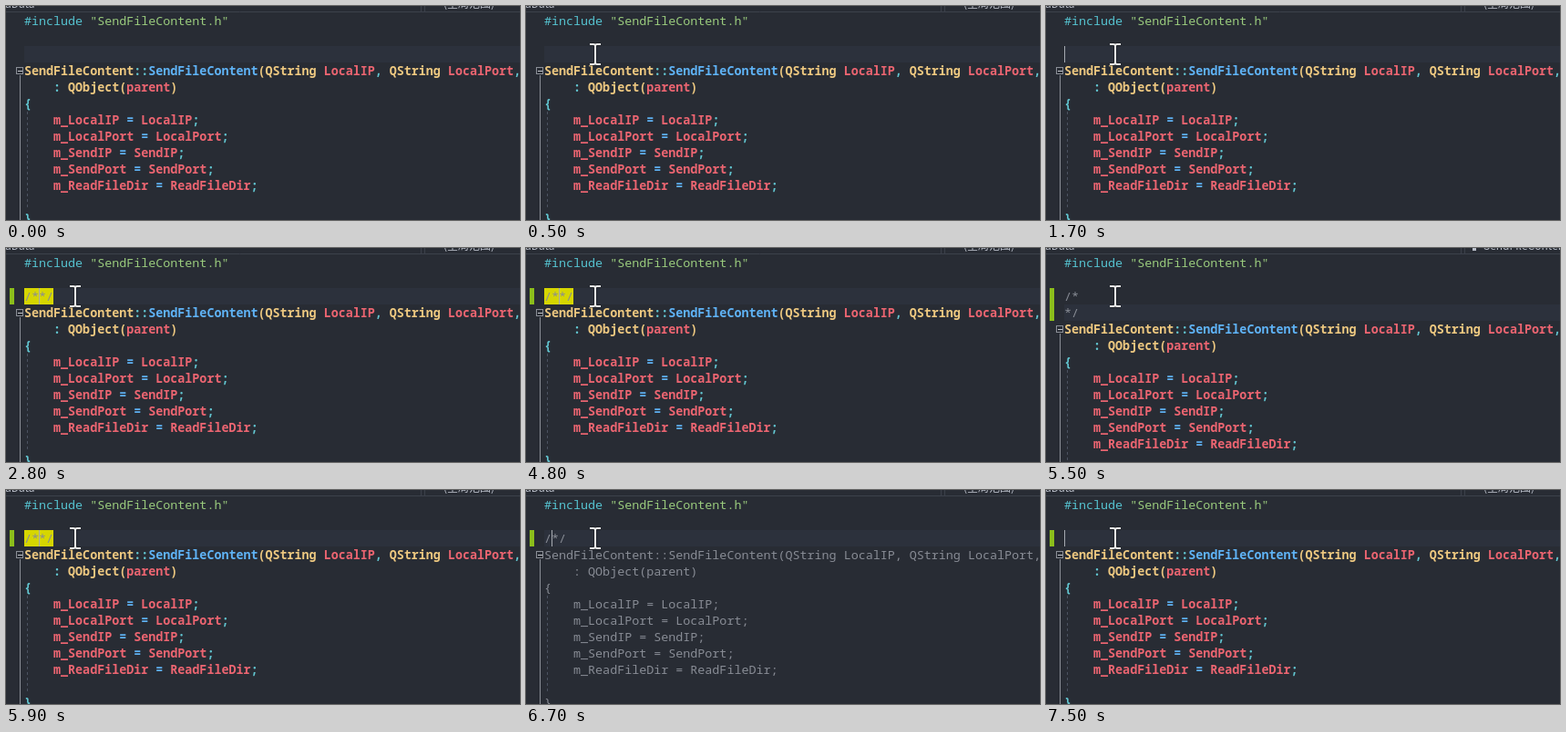
Recreate the animation shown at these times as an HTML page. Size 564 by 235 pixels, loop 8 s.

```html
<!DOCTYPE html>
<html lang="en">
<head>
<meta charset="utf-8">
<title>Code editor</title>
<style>
html, body { margin: 0; width: 100%; height: 100%; overflow: hidden; background: #282c34; }
svg { display: block; position: absolute; left: 0; top: 0; }
text { font: 13.36px "Noto Sans Mono", "DejaVu Sans Mono", monospace; white-space: pre; }
.nav text { font: 12px "Noto Sans CJK SC", "Noto Sans CJK", "Open Sans", sans-serif; fill: #b9bec8; }
.kw, .str { font-weight: 500; }
.type, .fn, .var, .op, .eq { font-weight: 600; }
.kw { fill: #56c3d0; } .str { fill: #9acb7d; } .type { fill: #edc880; }
.fn, .eq { fill: #5fb3f6; } .var { fill: #ec6571; } .op { fill: #62c6d1; }
.note { fill: #888c95; }
.muted tspan { fill: #888c95; font-weight: 400; }
</style>
</head>
<body>
<svg width="564" height="235" viewBox="0 0 564 235">
  <rect width="564" height="235" fill="#282c34"/>
  <g class="nav">
    <path d="M0 6.5H564M455.5 0V6M459.5 0V6" stroke="#3c414b" fill="none"/>
    <text x="-1" y="2">aData</text>
    <text id="scope" x="480" y="2">(全局范围)</text>
    <rect id="icon" x="468" y="0" width="4" height="3" fill="#b9bec8"/>
  </g>
  <rect id="band" x="20" width="544" height="18" fill="#2c313c"/>
  <rect id="margin" x="4" y="44" width="5" fill="#8cbe1b"/>
  <rect id="match" x="20" y="44" width="32" height="18" fill="#d6d600"/>
  <g id="head"></g>
  <text id="typed" class="note" x="20" y="58"></text>
  <text id="closing" class="note" x="20" y="76">*/</text>
  <g id="body">
    <path d="M15.5 76V260" stroke="#8b8f97" fill="none"/>
    <path d="M23.5 116V224" stroke="#4b5160" stroke-dasharray="3 3" fill="none"/>
    <rect x="11.5" y="67.5" width="7" height="7" fill="#282c34" stroke="#8b8f97"/>
    <path d="M13 71.5H18" stroke="#c3c6cb"/>
    <g id="code"></g>
  </g>
  <rect id="caret" width="1" height="18" fill="#a6aab1"/>
  <g id="mouse" fill="none">
    <path id="beam" d="M-6 -11H-2Q0 -11 0 -9Q0 -11 2 -11H6M0 -9V9M-6 11H-2Q0 11 0 9Q0 11 2 11H6" stroke="#16181c" stroke-width="3"/>
  </g>
</svg>
<script>
const $ = id => document.getElementById(id);
const NS = "http://www.w3.org/2000/svg";
const LOOP = 8000, LINE = 18, CHAR = 8;

// Each line is a list of "class:text" runs.
function addLine(parent, y, runs) {
  const line = document.createElementNS(NS, "text");
  line.setAttribute("x", 20);
  line.setAttribute("y", y);
  for (const run of runs) {
    const cut = run.indexOf(":");
    const span = document.createElementNS(NS, "tspan");
    span.setAttribute("class", run.slice(0, cut));
    span.textContent = run.slice(cut + 1);
    line.append(span);
  }
  parent.append(line);
}

addLine($("head"), 21, ["kw:#include ", 'str:"SendFileContent.h"']);
const code = $("code");
const addCode = (row, ...runs) => addLine(code, 22 + row * LINE, runs);
addCode(3, "type:SendFileContent", "op:::", "fn:SendFileContent", "type:(",
  "type:QString ", "var:LocalIP", "op:, ", "type:QString ", "var:LocalPort", "op:,");
addCode(4, "op:    : ", "type:QObject", "type:(", "var:parent", "type:)");
addCode(5, "op:{");
["LocalIP", "LocalPort", "SendIP", "SendPort", "ReadFileDir"].forEach((name, i) =>
  addCode(6 + i, "var:    m_" + name, "eq: = ", "var:" + name, "op:;"));
addCode(12, "op:}");

// Light core over the dark outline of the pointer.
const core = $("beam").cloneNode();
core.removeAttribute("id");
core.setAttribute("stroke", "#ececec");
core.setAttribute("stroke-width", 2);
$("mouse").append(core);

// time, typed text, caret column, caret on
const steps = [
  [0, "", 0, 0], [700, "", 0, 1], [1200, "", 0, 0], [1700, "", 0, 1],
  [2000, "/", 1, 1], [2400, "/", 1, 0],
  [2800, "/**/", 2, 1], [3300, "/**/", 2, 0], [3800, "/**/", 2, 1],
  [4300, "/**/", 2, 0], [4800, "/**/", 2, 1],
  [5000, "/*", 0, 1], [5500, "/*", 0, 0],
  [5900, "/**/", 2, 1], [6400, "/**/", 2, 0],
  [6700, "/*/", 1, 1], [7100, "*/", 0, 1], [7300, "/", 0, 1], [7500, "", 0, 1]
];
// time, x, y
const path = [[0, 640, 96], [100, 523, 84], [200, 330, 74], [300, 180, 62], [400, 100, 55], [500, 76, 53]];

const at = (table, t) => table.findLast(row => row[0] <= t);
const show = (id, on) => $(id).setAttribute("visibility", on ? "visible" : "hidden");

function draw(t) {
  const [, text, col, caretOn] = at(steps, t);
  const split = text === "/*";
  const row = split ? 3 : 2;
  const top = 8 + row * LINE;
  const inside = t >= 5100 && t < 5900;

  $("typed").textContent = text;
  $("typed").setAttribute("class", text === "/" || text === "*/" ? "eq" : "note");
  show("closing", split);
  show("match", text === "/**/");
  $("margin").setAttribute("height", t < 2000 ? 0 : split ? 36 : 18);
  $("band").setAttribute("y", top);
  $("body").setAttribute("transform", `translate(0 ${split ? LINE : 0})`);
  code.setAttribute("class", text === "/*/" ? "muted" : "");

  $("caret").setAttribute("x", 20 + col * CHAR);
  $("caret").setAttribute("y", top);
  show("caret", caretOn);

  $("scope").textContent = inside ? "SendFileContent" : "(全局范围)";
  show("icon", inside);

  const [, x, y] = at(path, t);
  $("mouse").setAttribute("transform", `translate(${x} ${y})`);
}

const start = performance.now();
function tick() {
  draw((performance.now() - start) % LOOP);
  requestAnimationFrame(tick);
}
tick();
</script>
</body>
</html>
```
